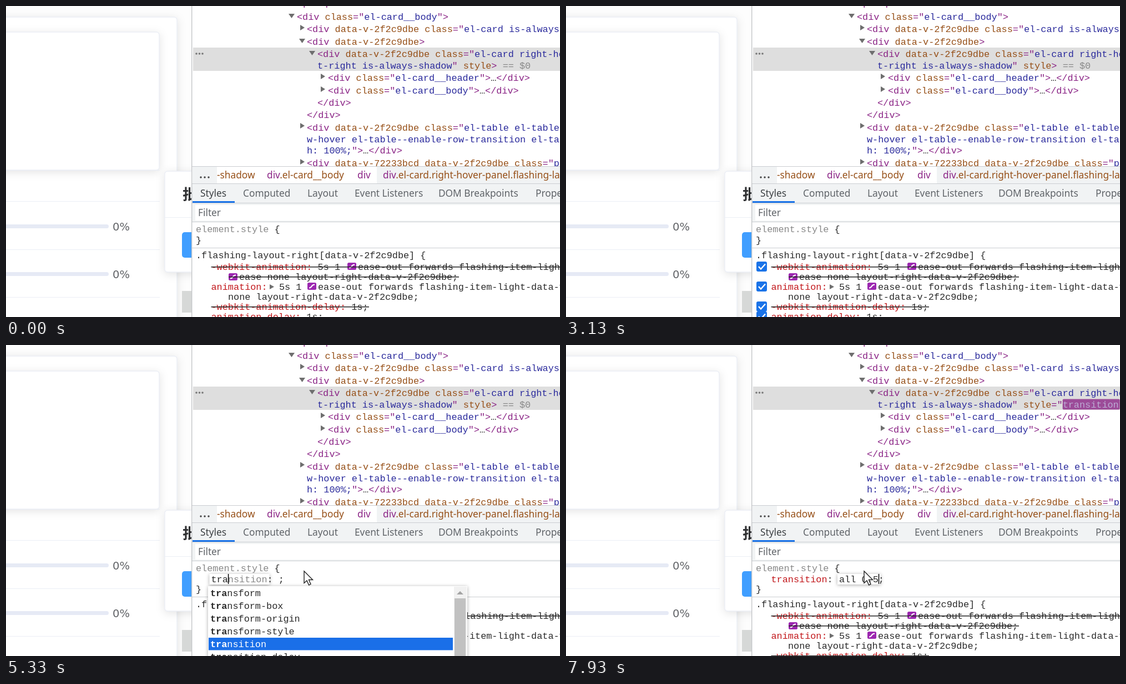
Animation, 998 px wide and 561 px high, one loop 8 s. Source, as an HTML page:

```html
<!DOCTYPE html>
<html lang="en">
<head>
<meta charset="utf-8">
<title>Styles pane</title>
<style>
html, body { margin: 0; width: 100%; height: 100%; overflow: hidden; background: #fff; }
svg { display: block; width: 998px; height: 561px; }
text { white-space: pre; }
.mono { font: 16.85px "Liberation Mono", monospace; }
.ui { font: 17.3px "Noto Sans", sans-serif; }
.percent { font: 19.5px "DejaVu Sans", sans-serif; fill: #606266; }
.title { font: 700 27px "Noto Sans CJK SC", "Noto Sans CJK", sans-serif; fill: #303133; }
.card { fill: #fff; stroke: #ebeef5; stroke-width: 1.4; filter: drop-shadow(0 3px 8px rgba(0,0,0,.11)); }
.float { fill: #fff; filter: drop-shadow(0 1px 3px rgba(0,0,0,.33)); }
</style>
</head>
<body>
<svg id="stage" viewBox="0 0 998 561" xmlns="http://www.w3.org/2000/svg"></svg>
<script>
const LOOP = 8000, STEP = 1000 / 15, CHAR = 16.85 * 0.6;
const PROP_X = 369.5, VALUE_X = 492, ATTR_X = 561 + 33 * CHAR;
const BLUE = "#1a6fe8";

// Markup: segments split by "|", the first character picks the colour.
const INK = { t: "#8a2385", a: "#964f17", v: "#2a2a9c", k: "#2a2a2a", g: "#888", r: "#c2181c", w: "#fff", n: "#5f6368", s: "#3c4043" };

const esc = s => s.replace(/&/g, "&amp;").replace(/</g, "&lt;");
const rect = (x, y, w, h, fill, extra = "") =>
  `<rect x="${x}" y="${y}" width="${w}" height="${h}" fill="${fill}" ${extra}/>`;
const path = (d, fill, extra = "") => `<path d="${d}" fill="${fill}" ${extra}/>`;
const spans = markup => markup.split("|").map(s => `<tspan fill="${INK[s[0]]}">${esc(s.slice(1))}</tspan>`).join("");
const text = (cls, x, y, markup, extra = "") => `<text class="${cls}" x="${x}" y="${y}" ${extra}>${spans(markup)}</text>`;
const mono = (x, y, markup, extra) => text("mono", x, y + 0.5, markup, extra);
const ui = (x, y, markup) => text("ui", x, y, markup);
const hline = (x1, x2, y, color) => rect(x1, y, x2 - x1, 1, color);

const arrowDown = (x, y) => path(`M${x} ${y}h11l-5.5 8z`, "#6e6e6e");
const arrowRight = (x, y) => path(`M${x} ${y}v10l8 -5z`, "#6e6e6e");

function page() {
  const row = y =>
    rect(-10, y, 195, 7, "#e6eaf5", 'rx="3.5"') +
    `<text class="percent" x="192" y="${y + 11}">0%</text>`;
  return rect(0, 0, 335, 561, "#fdfdfd") +
    '<rect class="card" x="-40" y="20" width="348" height="600" rx="5"/>' +
    '<rect class="card" x="-40" y="47" width="316" height="249" rx="5"/>' +
    [296, 352, 439, 525].map(y => hline(0, 277, y, "#ebeef5")).join("") +
    row(394) + row(480) +
    rect(317, 514, 18, 39, "#d6d8d7");
}

const panel = () =>
  '<g id="panel"><rect class="card" x="286" y="298" width="453" height="182" rx="5"/>' +
  hline(286, 739, 381, "#ebeef5") +
  '<text class="title" x="318" y="350">批量操作</text>' +
  rect(317, 408, 107, 46, "#409eff", 'rx="5"') + "</g>";

function domTree() {
  const open = "t<div ", id = "|adata-v-2f2c9dbe", cls = '|aclass|t="|v', folded = '|t">|k…|t</div>';
  const lines = [
    [525, -1, "t<p></p>"],
    [524, 24, `${open}${cls}el-card__body|t">`],
    [542, 46, `${open}${id} ${cls}el-card is-always-shadow`],
    [542, 69, `${open}${id}|t>`],
    [561, 91, `${open}${id} ${cls}el-card right-hover-panel`],
    [580, 134, `${open}${cls}el-card__header${folded}`],
    [580, 157, `${open}${cls}el-card__body${folded}`],
    [561, 179, "t</div>"],
    [542, 201, "t</div>"],
    [542, 224, `${open}${id} ${cls}el-table el-table--fit`],
    [542, 245, "vw-hover el-table--enable-row-transition el-table"],
    [542, 265, `vh: 100%;${folded}`],
    [542, 288, `${open}|adata-v-72233bcd data-v-2f2c9dbe ${cls}pagination`]
  ];
  return lines.map(l => mono(...l)).join("") +
    arrowDown(509, 14) + arrowDown(528, 59) + arrowDown(546, 81) +
    [[530, 34], [567, 122], [567, 145], [530, 211], [530, 276]].map(p => arrowRight(...p)).join("") +
    [343, 348.5, 354].map(x => `<circle cx="${x}" cy="86" r="1.8" fill="#777"/>`).join("");
}

function toolbars() {
  const tabs = [[427, "Computed"], [543, "Layout"], [628, "Event Listeners"], [779, "DOM Breakpoints"], [954, "Properties"]];
  return rect(335, 289, 663, 32, "#fff") + hline(335, 998, 289, "#cacdd1") +
    rect(336, 290, 44, 30, "#f1f3f4") + rect(668, 290, 330, 30, "#f1f3f4") +
    [351, 358, 365].map(x => `<circle cx="${x}" cy="309" r="1.7" fill="#444"/>`).join("") +
    ui(380, 311, "a-shadow") + ui(470, 311, "tdiv|a.el-card__body") + ui(633, 311, "tdiv") +
    ui(679, 311, "tdiv|a.el-card.right-hover-panel.flashing-layout-right") +
    rect(335, 320, 663, 69, "#f1f3f4") + hline(335, 998, 320, "#cacdd1") + hline(335, 998, 355, "#cacdd1") +
    ui(350, 344, "sStyles") + tabs.map(([x, s]) => ui(x, 344, "n" + s)).join("") +
    rect(336, 352, 76, 3, "#1a73e8") +
    rect(341, 359, 657, 28, "#fff") + ui(346, 379, "nFilter") + hline(335, 998, 389, "#cacdd1");
}

function rules() {
  const curve = (x, y) => rect(x, y, 16, 13, "#9c27b0", 'rx="2.5"') +
    path(`M${x + 3} ${y + 9.5}c6 0 3 -6 10 -6`, "none", 'stroke="#fff" stroke-width="2"');
  const strike = (x1, x2, y) => rect(x1, y, x2 - x1, 1.5, "#222");
  return hline(335, 998, 436, "#cacdd1") +
    mono(342, 454, "k.flashing-layout-right[data-v-2f2c9dbe] {") +
    mono(PROP_X, 475, "r-webkit-animation:|k 5s 1") + curve(615, 463) +
    mono(634, 475, "kease-out forwards flashing-item-light-data") + strike(PROP_X, 998, 470) +
    curve(401, 482) + mono(420, 493, "kease none layout-right-data-v-2f2c9dbe;") + strike(401, 816, 488) +
    mono(PROP_X, 511, "ranimation:") + path("M475 502v9l8 -4.5z", "#6e6e6e") + mono(492, 511, "k5s 1") +
    curve(543, 499) + mono(562, 511, "kease-out forwards flashing-item-light-data-v") +
    mono(400, 529, "knone layout-right-data-v-2f2c9dbe;") +
    mono(PROP_X, 547, "r-webkit-animation-delay:|k 1s;") + strike(PROP_X, 654, 542) +
    mono(PROP_X, 565, "ranimation-delay:|k 1s;");
}

const checks = [461, 497, 533, 551].map(y =>
  rect(343, y, 19, 18, "#1a73e8", 'rx="3"') +
  path(`M347 ${y + 9}l4 4.5l8 -9`, "none", 'stroke="#fff" stroke-width="2.4"')).join("");

const stage = document.getElementById("stage");
stage.innerHTML = page() + panel() +
  rect(335, 0, 663, 561, "#fff") + '<rect id="row" x="337" y="75" width="661" height="42"/>' +
  domTree() + '<g id="attr"></g>' + toolbars() +
  mono(342, 407, "gelement.style|k {") + '<g id="brace"></g>' +
  `<g id="rules">${rules()}</g><g id="checks">${checks}</g>` +
  rect(334, 0, 1.4, 561, "#c4c6c9") +
  '<g id="editor"></g>' +
  '<g id="pointer">' + path("M0 0V21.5L5 17L8.6 25L12 23.5L8.5 15.5H15.5Z", "#fff", 'stroke="#222" stroke-width="1.4"') + "</g>";

const node = Object.fromEntries(["panel", "row", "attr", "brace", "rules", "checks", "editor", "pointer"]
  .map(id => [id, document.getElementById(id)]));

const pointerPath = [
  [866, 300, 562], [1130, 290, 425], [1200, 290, 425], [1400, 279, 498], [1466, 278, 562],
  [1733, 282, 562], [2000, 277, 400], [2200, 277, 400], [2400, 290, 430], [2600, 290, 430],
  [2733, 287, 510], [2790, 286, 562], [3133, 450, 562], [3600, 537, 408]
];
const propKeys = [[4125, ""], [4460, "t"], [5060, "tr"], [5325, "tra"], [5460, "tran"], [5590, "trans"]];
const valueKeys = [[6125, ""], [6925, "a"], [7130, "al"], [7260, "all"], [7390, "all "], [7525, "all 0"], [7725, "all 0."], [7790, "all 0.5"]];
const textProps = ["tab-size", "table-layout", "text-align", "text-align-last", "text-anchor", "text-combine-upright"];
const moveProps = ["transform", "transform-box", "transform-origin", "transform-style", "transition", "transition-delay"];

const within = (t, a, b) => t >= a && t < b;
const latest = (keys, t) => keys.filter(k => k[0] <= t).pop();

function pointerAt(t) {
  const i = pointerPath.findIndex(p => p[0] > t);
  if (i === 0) return [300, 600];
  if (i < 0) return pointerPath[pointerPath.length - 1].slice(1);
  const [t0, x0, y0] = pointerPath[i - 1], [t1, x1, y1] = pointerPath[i], u = (t - t0) / (t1 - t0);
  return [x0 + (x1 - x0) * u, y0 + (y1 - y0) * u];
}

function input(x, typed, choice, tail, caret) {
  const ghost = choice.startsWith(typed) ? choice.slice(typed.length) : "";
  const end = (typed + ghost).length * CHAR;
  return `<rect class="float" x="${x - 3}" y="413" width="${end + 7}" height="19"/>` +
    mono(x, 427, `k${typed}|g${ghost}|k${tail}`) +
    (caret ? rect(x + typed.length * CHAR, 413, 1.5, 18, "#000") : "");
}

function menu(x, width, height, items, selected, typed, scrolls) {
  const inner = width - (scrolls ? 26 : 0);
  const rows = items.map((item, i) => {
    const y = 452.5 + 23 * i, ink = i === selected ? INK.w : INK.k;
    const n = item.startsWith(typed) ? typed.length : 0;
    return `<text class="mono" x="${x + 4}" y="${y}" fill="${ink}"><tspan font-weight="700">${item.slice(0, n)}</tspan>${item.slice(n)}</text>`;
  });
  return `<rect class="float" x="${x}" y="435" width="${width}" height="${height}"/>` +
    rect(x + 1, 436 + 23 * selected, inner - 1, 22.5, BLUE) + rows.join("") +
    (scrolls ? rect(x + 443, 436, 23, 140, "#f1f1f1") + rect(x + 444, 457, 20, 120, "#c1c1c1") +
      path(`M${x + 448} 450h12l-6 -6z`, "#a3a3a3") : "");
}

function editor(t) {
  if (t < propKeys[0][0]) return "";
  if (t < valueKeys[0][0]) {
    const typed = latest(propKeys, t)[1];
    const items = typed === "t" ? textProps : moveProps, selected = typed === "t" ? 2 : 4;
    return input(PROP_X, typed, typed && items[selected], ": ;", true) +
      (typed ? menu(364, 467, 140, items, selected, typed, true) : "");
  }
  const typed = latest(valueKeys, t)[1];
  const items = typed ? ["auto", "initial"].filter(s => s.includes(typed)) : [];
  return mono(PROP_X, 427, "rtransition|k:") +
    input(VALUE_X, typed, items[0] || "", ";", !within(t, 6590, 6860)) +
    (items.length ? menu(487.5, 137, 23 * items.length + 1, items, 0, typed, false) : "");
}

function styleAttr(t) {
  const head = 'vt-right is-always-shadow|t" |astyle';
  const [changed, value] = latest(valueKeys, t) || [0, ""];
  if (!value) return mono(561, 112, head + "|t>") + mono(ATTR_X, 112, "g== $0", 'font-style="italic"');
  const glow = Math.max(0, Math.min(1, 1.14 - (t - changed) / 400));
  return mono(561, 112, `${head}|t="|vtransition`) +
    `<g opacity="${glow}">${rect(ATTR_X, 97.5, 103, 19, INK.t, 'rx="2"')}` +
    mono(ATTR_X, 112, "wtransition", `opacity="${glow}"`) + "</g>";
}

function render(time) {
  const t = Math.floor((time + 5) / STEP) * STEP;
  const editing = t >= propKeys[0][0];
  const opened = within(t, 990, 1460) || within(t, 2260, 2725);
  const [px, py] = pointerAt(t);
  node.panel.setAttribute("transform", `translate(${opened ? -406 : 0} 0)`);
  node.row.setAttribute("fill", within(t, 3990, 4125) ? "#cfe8fc" : "#dedede");
  node.attr.innerHTML = styleAttr(t);
  node.brace.innerHTML = mono(342, editing ? 445 : 427, "k}");
  node.rules.setAttribute("transform", `translate(0 ${editing ? 18 : 0})`);
  node.checks.setAttribute("visibility", within(t, 3125, 3500) ? "visible" : "hidden");
  node.editor.innerHTML = editor(t);
  node.pointer.setAttribute("transform", `translate(${px} ${py})`);
}

const start = performance.now();
function tick() {
  render((performance.now() - start) % LOOP);
  requestAnimationFrame(tick);
}
tick();
</script>
</body>
</html>
```
